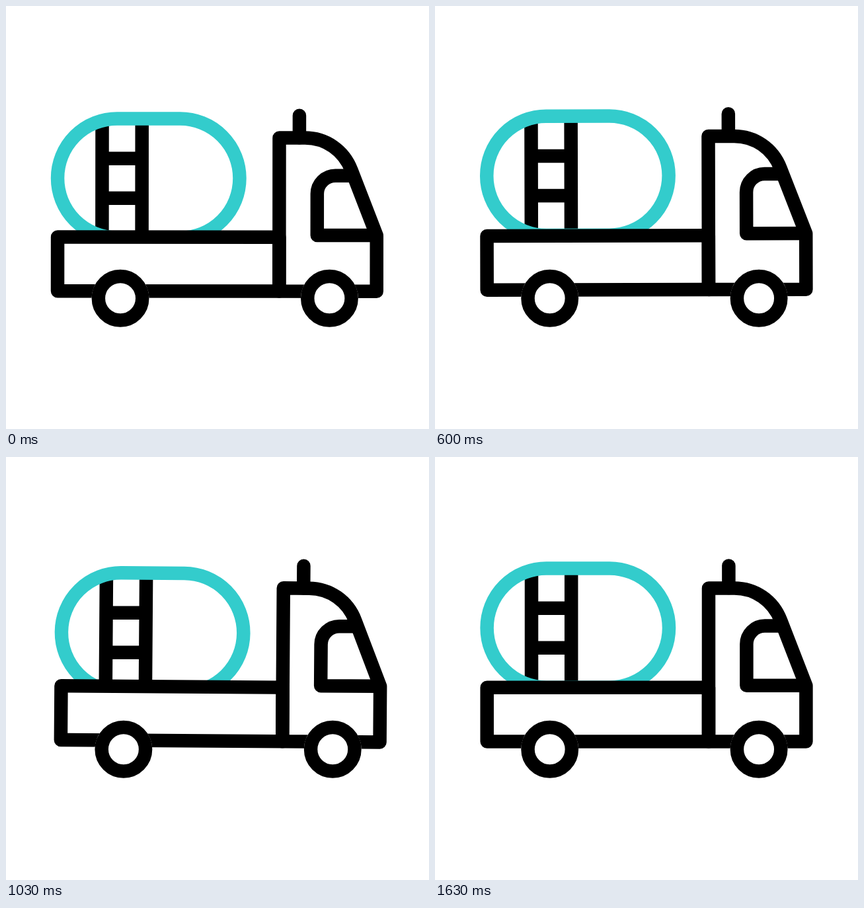
These frames come from a looping animation (640 px wide and 640 px high, 1.67 s). An HTML page with a canvas:

```html
<!DOCTYPE html>
<html lang="en">
<head>
<meta charset="utf-8">
<title>Tank truck</title>
<style>
  html, body { margin: 0; width: 100%; height: 100%; overflow: hidden; background: #fff; }
  canvas { display: block; width: 100%; height: 100%; }
</style>
</head>
<body>
<canvas id="stage" width="640" height="640"></canvas>
<script>
const ctx = document.getElementById('stage').getContext('2d');
const LOOP = 1670, STEP = 100 / 3, LAST = 49;
const LINE = 20.5, BLACK = '#000', TEAL = '#33cccc';
const PIVOT = { x: 320, y: 430.4 };

const ease = u => u * u * (3 - 2 * u);

// Eases from one [step, value] key to the next.
function swing(...keys) {
  return t => {
    const next = keys.findIndex(([step]) => step > t);
    if (next < 0) return keys[keys.length - 1][1];
    const [t0, from] = keys[next - 1], [t1, to] = keys[next];
    return from + (to - from) * ease((t - t0) / (t1 - t0));
  };
}

const shift = swing([-1, 0], [11.6, -37.5], [24.4, 37.5], [36.4, -20.5], [48, 0]);
const tilt = swing([-1, 0], [12, 2.5], [23.8, -2.62], [35, 1.65], [48, 0]);
const bounce = swing([-2, 0], [11.3, 17.3], [18, -1.2], [26, 11.5], [36.4, -14.4], [48, 0]);
const tankDrop = swing([-2, 0], [11.3, 16.4], [18, -0.9], [28, 11.5], [37, 0.2], [48, 0]);

const tank = new Path2D();
tank.roundRect(78.6, 168.5, 275.4, 180.2, 90);

const ladder = new Path2D('M146 172V348 M206.2 172V348 M146 228.8H206 M146 288.8H206');
const bed = new Path2D('M414 348.7H78.7V430.4H414Z');
const cab = new Path2D('M414 430.4V198.4H453C484 198.4 511.5 217 523 247L561.4 346V430.4Z');
const cabWindow = new Path2D('M526 255.6H499A27.6 27.6 0 0 0 471.4 283.2V345.8H561');
const beacon = new Path2D('M444.4 164.6V198');

function stroke(path, color = BLACK, cap = 'butt') {
  ctx.strokeStyle = color;
  ctx.lineCap = cap;
  ctx.stroke(path);
}

function drawBody(t) {
  ctx.save();
  ctx.translate(PIVOT.x + shift(t), PIVOT.y + bounce(t));
  ctx.rotate(tilt(t) * Math.PI / 180);
  ctx.translate(-PIVOT.x, -PIVOT.y);

  ctx.save();
  ctx.translate(0, tankDrop(t));
  stroke(ladder);
  stroke(tank, TEAL);
  ctx.restore();

  ctx.fillStyle = '#fff';
  ctx.fill(bed);
  for (const part of [bed, cab, cabWindow]) stroke(part);
  stroke(beacon, BLACK, 'round');
  ctx.restore();
}

function drawWheel(x) {
  const circle = radius => {
    const path = new Path2D();
    path.arc(x, 442.3, radius, 0, 2 * Math.PI);
    return path;
  };
  ctx.fillStyle = '#fff';
  ctx.fill(circle(43.5));
  stroke(circle(33.2));
}

function draw(now) {
  const t = Math.min(LAST, Math.floor((now % LOOP + 5) / STEP));
  ctx.fillStyle = '#fff';
  ctx.fillRect(0, 0, 640, 640);
  ctx.lineWidth = LINE;
  ctx.lineJoin = 'round';
  drawBody(t);
  for (const x of [173.7, 490.1]) drawWheel(x + shift(t));
}

let start;
function tick(now) {
  start ??= now;
  draw(now - start);
  requestAnimationFrame(tick);
}
draw(0);
requestAnimationFrame(tick);
</script>
</body>
</html>
```
